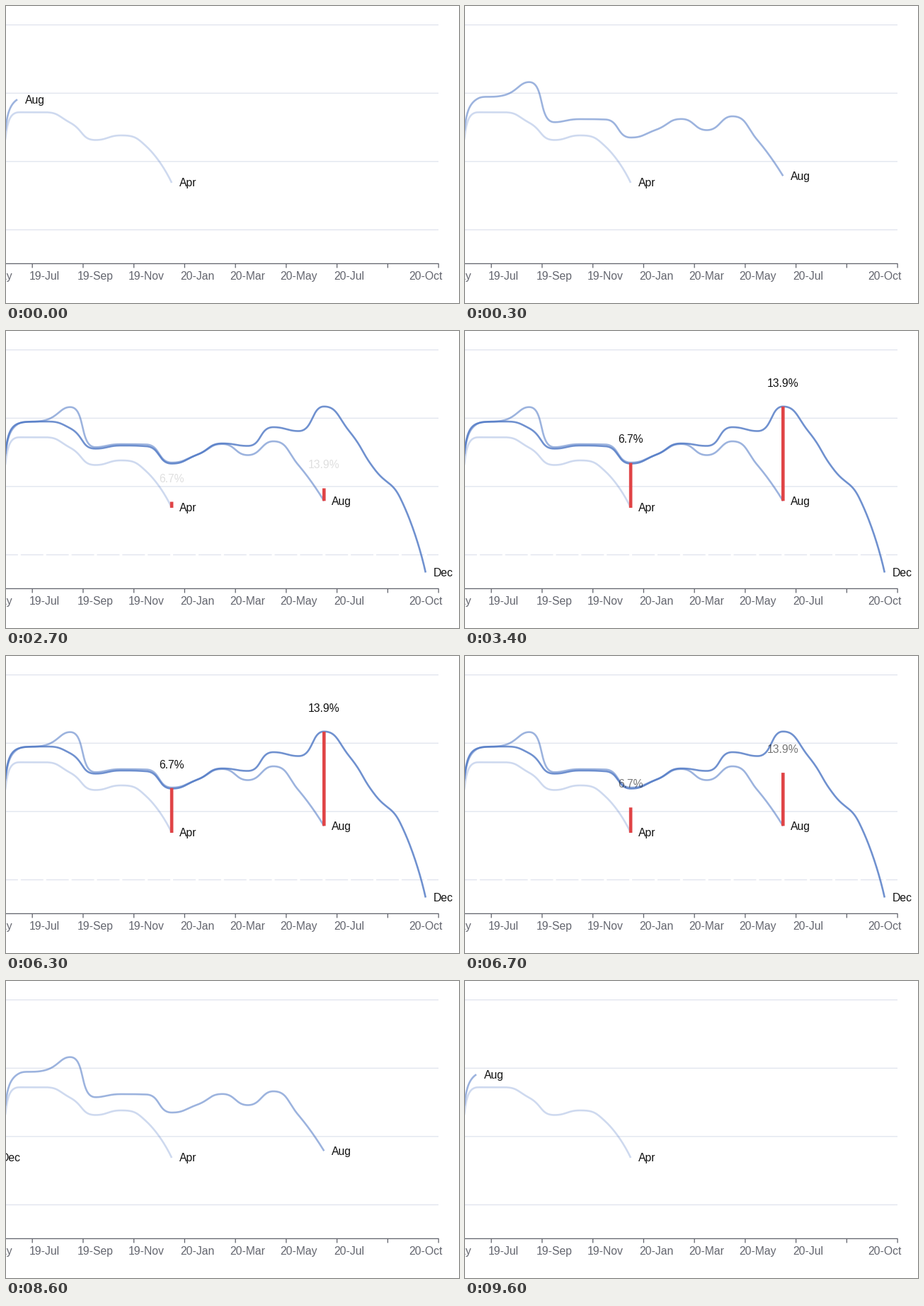
A matplotlib script for the animation above (9700 ms loop, 640 by 420 pixels).

```python
import numpy as np
import matplotlib.pyplot as plt
from matplotlib.animation import FuncAnimation
from matplotlib.patches import Rectangle

W, H, DPI = 640, 420, 100
PX = 72 / DPI
FRAMES, INTERVAL = 97, 100
STEP, LAST = 35.87, 592.8          # month width, x of the last month
GRID, AXIS, TEXT = "#e0e4ee", "#63656e", "#111111"
BLUE, RED = "#4c76c4", "#e04446"

plt.rcParams["font.family"] = "Liberation Sans"
fig = plt.figure(figsize=(W / DPI, H / DPI), dpi=DPI, facecolor="white")
ax = fig.add_axes([0, 0, 1, 1])
ax.set_xlim(0, W)
ax.set_ylim(H, 0)
ax.axis("off")


def month_x(i):
    return LAST - STEP * (16 - i)


def text(x, y, s, color=TEXT, ha="left"):
    return ax.text(x, y, s, color=color, ha=ha, va="baseline",
                   fontsize=15.8 * PX, zorder=6, clip_on=True)


def stroke(x, y, color, width, **kw):
    return ax.plot(x, y, color=color, lw=width * PX, snap=False,
                   solid_capstyle="butt", **kw)[0]


def block(x, y, w, h, color, z):
    return ax.add_patch(Rectangle((x - w / 2, y), w, h, fc=color, lw=0,
                                  zorder=z, snap=False))


def smooth_curve(ys, smooth=0.5):
    """Bezier through monthly values, handles clamped to avoid overshoot."""
    p = np.array([(month_x(i - 2), y) for i, y in enumerate(ys)], float)
    handles_in, handles_out = [p[0]], [p[0]]
    for a, b, c in zip(p, p[1:], p[2:]):
        before, after = np.hypot(*(b - a)), np.hypot(*(c - b))
        out = b + (c - a) * smooth * after / (after + before)
        out = np.clip(out, np.minimum(b, c), np.maximum(b, c))
        into = b - (out - b) * before / after
        into = np.clip(into, np.minimum(a, b), np.maximum(a, b))
        handles_in.append(into)
        handles_out.append(b + (b - into) * after / before)
    handles_in.append(p[-1])
    t = np.linspace(0, 1, 40)[:, None]
    parts = [(1 - t) ** 3 * a + 3 * t * (1 - t) ** 2 * h
             + 3 * t ** 2 * (1 - t) * g + t ** 3 * b
             for a, h, g, b in zip(p, handles_out, handles_in[1:], p[1:])]
    return np.vstack(parts).T


class Series:
    def __init__(self, name, ys, alpha):
        self.x, self.y = smooth_curve(ys)
        self.line = stroke([], [], BLUE, 2.6, alpha=alpha, zorder=3,
                           solid_joinstyle="round")
        self.label = text(0, 0, name)

    def reveal(self, tip):
        tip = min(tip, self.x[-1])
        tip_y = np.interp(tip, self.x, self.y)
        keep = self.x < tip
        self.line.set_data(np.append(self.x[keep], tip),
                           np.append(self.y[keep], tip_y))
        self.label.set_position((tip + 10.5, tip_y + 5.5))
        self.label.set_visible(tip > -40)


class Gap:
    def __init__(self, month, low, high, share):
        self.low, self.high = low, high
        x = month_x(month)
        self.bar = block(x, low, 4.6, 0, RED, 4)
        self.label = text(x, low, share, ha="center")

    def grow(self, k):
        top = self.low + (self.high - self.low) * k
        self.bar.set_y(top)
        self.bar.set_height(self.low - top)
        self.label.set_y(top - 28)
        self.label.set_alpha(k)


def cubic_in_out(p):
    p = min(max(p, 0), 1)
    return 4 * p ** 3 if p < 0.5 else 1 - 4 * (1 - p) ** 3


# Grid and axis
for i in range(4):
    stroke([0, 611], [26.7 + 96.6 * i] * 2, GRID, 1.3, zorder=1)
stroke([0, 611.5], [364.4] * 2, AXIS, 1.3, zorder=1)
for i in range(9):
    stroke([37.2 + 2 * STEP * i] * 2, [364.4, 370.4], AXIS, 1.3, zorder=1)
months = ["19-May", "19-Jul", "19-Sep", "19-Nov",
          "20-Jan", "20-Mar", "20-May", "20-Jul"]
for i, name in enumerate(months):
    text(month_x(2 * i - 1), 387.3, name, AXIS, "center")
text(LAST, 387.3, "20-Oct", AXIS, "center")

# Empty bars hide bits of the lowest grid line
blanks = [block(month_x(i), 315, 4, 3, "white", 2) for i in range(17)]

apr = Series("Apr", [300, 255, 150.3, 150.3, 165, 189.5, 183, 198.5, 250],
             0.27)
aug = Series("Aug", [300, 247, 130.5, 126.3, 107.6, 164.3, 160, 160.5, 186,
                     175, 159.8, 175.5, 156, 190, 240.3], 0.55)
dec = Series("Dec", [300, 247, 130.3, 128, 137.5, 166.4, 162, 163, 187.5,
                     175, 159, 162.5, 136, 141.5, 106.8, 142, 196, 236,
                     341.5], 0.8)
gaps = [Gap(6, 250, 186.5, "6.7%"), Gap(12, 240.3, 106.8, "13.9%")]


def draw(n):
    k = min(n, FRAMES - 1 - n)      # plays forward, then back
    apr.reveal(W)
    aug.reveal(16 + 148 * k)
    dec.reveal(468 + 162 * (k - 13))
    for b in blanks:
        b.set_visible(k >= 19)
    for g in gaps:
        g.grow(cubic_in_out((k - 23.78) / 10) if k >= 25 else 0)


anim = FuncAnimation(fig, draw, frames=FRAMES, interval=INTERVAL,
                     init_func=lambda: draw(0), repeat=True, repeat_delay=0)
plt.show()
```
